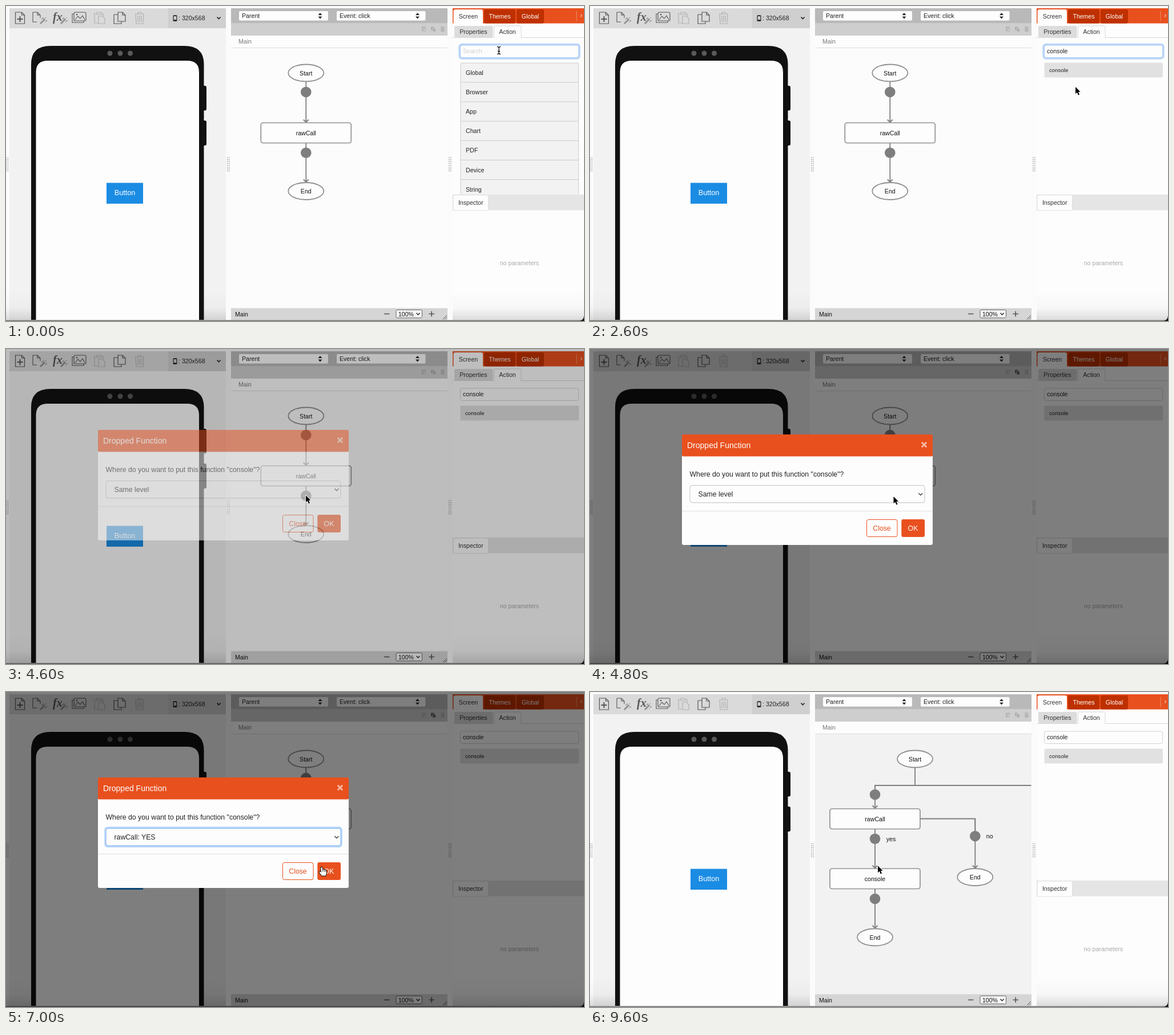
An HTML page that plays this animation: 1012x553 px, repeating every 10000 ms.

```html
<!DOCTYPE html>
<html lang="en">
<head>
<meta charset="utf-8">
<title>Flow editor</title>
<style>
html, body { margin: 0; width: 100%; height: 100%; overflow: hidden; background: #fbfbfb; }
svg { display: block; width: 100vw; height: 100vh; font-family: "Liberation Sans", Arial, sans-serif; }
</style>
</head>
<body>
<svg id="stage" viewBox="0 0 1012 553" xmlns="http://www.w3.org/2000/svg"></svg>
<script>
const ORANGE = '#e8501e', GREY = '#7e7e7e', WHITE = '#fdfdfd';

// Markup helpers
const rect = (x, y, w, h, fill, r = 0, extra = '') =>
  `<rect x="${x}" y="${y}" width="${w}" height="${h}" fill="${fill}" rx="${r}" ${extra}/>`;
const path = (d, stroke, width = 1, extra = '') =>
  `<path d="${d}" fill="none" stroke="${stroke}" stroke-width="${width}" ${extra}/>`;
const circle = (x, y, r, fill, extra = '') =>
  `<circle cx="${x}" cy="${y}" r="${r}" fill="${fill}" ${extra}/>`;
const text = (x, y, str, fill = '#222', size = 10.6, extra = '') =>
  `<text x="${x}" y="${y + size * 0.355}" font-size="${size}" fill="${fill}" ${extra}>${str}</text>`;
const label = (x, y, str, fill = '#111', size = 10.6) =>
  text(x, y, str, fill, size, 'text-anchor="middle"');
const group = (id, body, extra = '') => `<g id="${id}" ${extra}>${body}</g>`;
const at = (x, y, body, extra = '') => `<g transform="translate(${x} ${y})" ${extra}>${body}</g>`;
const outline = (color, width = 1) => `stroke="${color}" stroke-width="${width}"`;

function grip(x) {
  const dots = 'stroke-dasharray="1.6 1.7"';
  return path(`M${x - 1.5} 265.5V292M${x + 1.5} 265.5V292`, '#a5a5a5', 1.5, dots);
}

function wand(x, y) {
  return at(x, y, path('M-5 6L3 -2', '#555', 2.2) + path('M-5 6L3 -2', '#ddd', .8) +
    path('M0 -5V-2M5 -5L3.5 -3.5M4 1H7M-3 -3L-1.5 -1.5M4 4L3 3', '#555', .9));
}

function toolIcons() {
  const ink = '#565656', faint = '#b2b2b2';
  const page = 'M-8 -10H3L8 -5V10H-8ZM3 -10V-5H8';
  const copy = 'M-3 -10H5L10 -5V6H-3ZM5 -10V-5H10M-3 -6H-10V10H3V6';
  const bin = 'M-8 -7H8M-3 -7V-10H3V-7M-7 -7L-6 10H6L7 -7M-3 -4V7M0 -4V7M3 -4V7';
  return at(24.5, 21, path(page, ink, 1.2) + path('M0 -3V7M-5 2H5', ink, 2)) +
    at(54, 20, path('M-7 -9H1L6 -4V1M1 -9V-4H6M-7 -9V8H0', ink, 1.1)) + wand(65, 25) +
    text(82, 19, '<tspan font-style="italic">fx</tspan>', ink, 20,
      'font-family="Liberation Serif, serif" font-weight="bold"') + wand(101, 25) +
    at(128, 20, rect(-9, -9, 21, 15, 'none', 2, outline(ink, 1.1)) +
      path('M-9 -6H-12V9H8V6M-7 4L-2 -2L2 2L6 -3L10 4', ink, 1.1) + circle(-4, -5, 1.3, ink)) +
    at(164, 21, path('M-3 9H-9V-8H-5M2 -8H6V-3M-5 -10H2V-6H-5ZM-2 -3H5L9 1V10H-2Z', faint, 1.2)) +
    at(199, 21, path(copy, ink, 1.2)) +
    at(234, 21, path(bin, faint, 1.2));
}

function leftPanel() {
  return rect(6, 4, 379, 547, '#f2f2f2') + rect(6, 4, 379, 35, '#dadada') +
    rect(284, 4, 101, 35, '#cfcfcf') + toolIcons() +
    rect(292.5, 16, 7, 11, '#333', 1.5) + rect(293.8, 18, 4.4, 6, '#cfcfcf') +
    text(302, 21.5, ': 320x568') + path('M369.5 19.5L372.5 22.5L375.5 19.5', '#222', 1.7) +
    rect(0, 500, 385, 51, 'url(#floor)') +
    rect(336, 140, 15, 43.5, '#111', 3) + rect(336, 201, 15, 44, '#111', 3) +
    path('M44 551V102Q44 70 78 70H312Q346.5 70 346.5 102V551Z', 'none', 0, 'style="fill:#111"') +
    path('M52.5 551V116Q52.5 96 73 96H317Q338 96 338 116V551Z', 'none', 0, `style="fill:${WHITE}"`) +
    [182, 200, 217.5].map(x => circle(x, 83, 4.5, '#595959')).join('') +
    rect(176, 310.5, 64, 36.5, '#1b8ce3') + label(208, 328, 'Button', '#fff', 12.6);
}

function picker(x, w, str) {
  const a = x + w - 14;
  return rect(x, 9, w, 16.5, WHITE, 2) + text(x + 5, 17.7, str) +
    `<path d="M${a - 3.4} 16L${a} 12L${a + 3.4} 16ZM${a - 3.4} 18.5L${a} 22.5L${a + 3.4} 18.5Z" fill="#222"/>`;
}

function editorBars() {
  const dim = '#b5b5b5';
  return rect(394, 4, 379, 27, '#b9b9b9') + rect(394, 30, 379, 22, '#cecece') +
    picker(408, 156, 'Parent') + picker(579, 155.5, 'Event: click') +
    at(731.5, 40.5, rect(-3.5, -4, 7, 8, dim, 1) + rect(-1, -1, 4, 4, '#c9c9c9')) +
    group('copyIcon', rect(-4, -4, 5.5, 6, 'currentColor', .5) + rect(-1, -1.5, 5.5, 6, 'currentColor', .5, outline('#cecece', .7)),
      'transform="translate(748 40.5)"') +
    at(764.5, 40.5, rect(-3, -2, 6, 6.5, dim, .8) + path('M-4 -3.3H4M-1.5 -4.4H1.5', dim, 1.2)) +
    rect(394, 52, 379, 22, WHITE) + path('M394 73.5H773', '#dcdcdc') +
    text(407, 62.5, 'Main', '#777') +
    rect(394, 530.5, 379, 20.5, '#d5d5d5') + text(401, 541, 'Main', '#111') +
    path('M662 540.5H671.5M740.5 540.5H750M745.2 535.8V545.2', '#555', 1.6) +
    rect(683, 533.5, 45.5, 14, '#f4f4f4', 2, outline('#666')) + text(687, 541, '100%', '#111', 10.5) +
    path('M718.5 539L721.5 542L724.5 539', '#222', 1.3) +
    path('M765 550L772 543M768.5 550L772 546.5', '#555', 1);
}

// Flow chart pieces
const oval = (x, y, str) =>
  `<ellipse cx="${x}" cy="${y}" rx="31" ry="15" fill="${WHITE}" ${outline('#929292', 1.8)}/>` + label(x, y + .5, str);
const box = (x, y, str) =>
  rect(x - 79, y, 158, 35.5, WHITE, 4, outline('#929292', 1.7)) + label(x, y + 18, str);
const wire = d => path(d, GREY, 1.8);
const arrow = (x, y1, y2) => wire(`M${x} ${y1}V${y2}M${x - 4.5} ${y2 - 5.5}L${x} ${y2 - 1}L${x + 4.5} ${y2 - 5.5}`);
const knot = (x, y, extra = '') => circle(x, y, 9.3, GREY, extra);

function flowBefore() {
  return rect(394, 74, 379, 456.5, '#fcfcfc') +
    arrow(525.3, 132, 205) + arrow(525.3, 240, 310) +
    knot(525.3, 151) + knot(525.3, 257.7, 'id="dropSpot"') +
    oval(525.3, 117.5, 'Start') + box(525.3, 205, 'rawCall') + oval(525.3, 325, 'End');
}

function flowAfter() {
  return rect(394, 74, 379, 456.5, '#f2f2f2') +
    wire('M569 132V164H772.5M569 164H499V170') + arrow(499, 164, 205) + arrow(499, 240, 310) +
    arrow(499, 345, 415.5) + wire('M578 222.5H674.3V250') + arrow(674.3, 222.5, 310) +
    knot(499, 180) + knot(499, 257.7) + knot(499, 363) + knot(674.3, 253) +
    label(527, 258, 'yes') + label(699.7, 253, 'no') +
    oval(569, 117.5, 'Start') + box(499, 205, 'rawCall') + box(499, 310, 'console') +
    oval(499, 430.5, 'End') + oval(674.3, 325, 'End');
}

function categories() {
  const names = ['Global', 'Browser', 'App', 'Chart', 'PDF', 'Device', 'String'];
  return rect(796, 100, 206.5, 240, '#f2f2f2', 2, outline('#cbcbcb')) +
    names.map((name, i) => (i ? path(`M796 ${99.8 + i * 34.15}H1002.5`, '#cbcbcb') : '') +
      text(805, 117 + i * 34.15, name)).join('');
}

function rightPanel() {
  const tab = (x, w, str) => rect(x, 6, w, 24.5, '#be3000', 3) + label(x + w / 2, 18, str, '#fff', 10.5);
  return rect(782, 4, 230, 547, WHITE) + rect(782, 4, 230, 26.5, ORANGE) +
    '<path d="M783.5 32V9Q783.5 6 787 6H831.5Q835 6 835 9V32Z" fill="#fdfdfd"/>' + label(809.5, 18, 'Screen', '#333', 10.5) +
    tab(837, 55, 'Themes') + tab(894, 48, 'Global') +
    path('M999 9V26', '#f2926f') + path('M1006 14.5L1008.5 17L1006 19.5', '#f7b8a0', 1.1) +
    path('M782 55.5H1012', '#d8d8d8') + rect(785, 35, 67.5, 20, '#dcdcdc', 2) + label(818.3, 45.3, 'Properties', '#333') +
    `<path d="M854.5 56V37Q854.5 35 857 35H899.5Q902 35 902 37V56" fill="${WHITE}" stroke="#d8d8d8"/>` + label(878, 45.3, 'Action', '#333') +
    group('glow', rect(794, 67.5, 210, 24.5, 'none', 4, outline('#bcd6f8', 3.4))) +
    rect(795.5, 69, 207, 21.5, WHITE, 3, 'id="field" ' + outline('#d2d2d2')) +
    text(800, 79.7, '', '#222', 10.6, 'id="query"') +
    group('cats', categories()) +
    group('hit', rect(795.5, 99.5, 207.5, 26, '#e1e1e1', 2) + text(804, 112.5, 'console', '#222', 9.7)) +
    rect(782, 331, 230, 222, WHITE) + rect(782, 331, 230, 27.5, '#e5e5e5') +
    `<path d="M783 359V334.5Q783 332 786 332H841.5Q844.5 332 844.5 334.5V359Z" fill="${WHITE}" stroke="#dadada" stroke-width=".8"/>` +
    label(813.7, 345.4, 'Inspector', '#333') + label(899, 451, 'no parameters', '#a9a9a9') +
    rect(782, 500, 230, 51, 'url(#floor)');
}

function dialog() {
  return rect(161, 150, 439, 194, WHITE, 3) + rect(161, 150, 439, 38.5, ORANGE, 2) +
    text(170, 168.7, 'Dropped Function', '#fff', 14) +
    path('M580.8 163.8L589.2 172.2M589.2 163.8L580.8 172.2', '#f6b9a3', 2.8) +
    text(174.5, 219.2, 'Where do you want to put this function "console"?', '#222', 12.27) +
    group('selectGlow', rect(173.8, 238, 413.5, 33.3, 'none', 4, outline('#b4d4fb', 3))) +
    rect(175, 239.5, 411, 30.3, WHITE, 4, 'id="selectBox" ' + outline('#c0c0c8')) +
    text(189.5, 254.7, '', '#222', 12.27, 'id="choice"') + path('M575.3 253.2L578.8 256.7L582.3 253.2', '#333', 1.3) +
    path('M161 284.5H600', '#dedede') +
    rect(484.5, 299.5, 53.5, 30, WHITE, 3, outline(ORANGE)) + label(511, 314.3, 'Close', ORANGE, 12.3) +
    rect(545.3, 299, 40.7, 31, ORANGE, 3) + label(565.5, 314.3, 'OK', '#fff', 12.3);
}

function pointers() {
  const plus = 'M0 -6L2.2 -3.4H.9V-.9H3.4V-2.2L6 0L3.4 2.2V.9H.9V3.4H2.2L0 6L-2.2 3.4H-.9V.9H-3.4V2.2L-6 0L-3.4 -2.2V-.9H-.9V-3.4H-2.2Z';
  const hand = 'M3.2 1.2Q4.6 -.4 5.7 1.3L6.4 5Q8 3.8 8.9 5.4Q10.4 4.6 11 6.2Q12.6 5.8 12.8 7.5L13 11L11.5 15.5H5L1 10.2Q-.2 8.4 1.4 8L4 9.4Z';
  const solid = (d, fill, edge, w = 1) =>
    `<path d="${d}" fill="${fill}" stroke="${edge}" stroke-width="${w}" stroke-linejoin="round" paint-order="stroke"/>`;
  return group('ibeam', path('M-3 -6.5Q0 -6.5 0 -4.5Q0 -6.5 3 -6.5M0 -5V5M-3 6.5Q0 6.5 0 4.5Q0 6.5 3 6.5M-2 1.5H2', '#111', 1.3)) +
    group('arrow', solid('M0 0V12.2L2.8 9.6L4.9 14.4L7 13.5L4.9 8.8H8.6Z', '#000', '#fff', 1.8)) +
    group('badge', circle(8, 18, 8, '#17a11d', outline('#fff', .8)) + path('M8 13.7V22.3M3.7 18H12.3', '#fff', 2)) +
    group('hand', at(-4, -1, solid(hand, '#fff', '#000', 1.8) + path('M6.4 5V8M8.9 6V8.5M11 7V9', '#000', .8))) +
    group('move', solid(plus, '#000', '#fff', 1.8));
}

const stage = document.getElementById('stage');
stage.innerHTML = `<defs>
  <linearGradient id="floor" x1="0" y1="0" x2="0" y2="1">
    <stop offset="0" stop-color="#000" stop-opacity="0"/><stop offset=".6" stop-color="#000" stop-opacity=".025"/>
    <stop offset="1" stop-color="#000" stop-opacity=".13"/></linearGradient>
  <filter id="soft" x="-10%" y="-60%" width="120%" height="220%"><feGaussianBlur stdDeviation="4"/></filter></defs>` +
  rect(0, 0, 1012, 553, '#fbfbfb') + leftPanel() +
  group('before', flowBefore()) + group('after', flowAfter()) + editorBars() + rightPanel() +
  grip(2) + grip(389.3) + grip(777.3) +
  rect(0, 551.4, 1012, 1.6, '#77736f') + '<path d="M1012 544V553H1004Q1011 552 1012 544Z" fill="#111"/>' +
  group('ghost', rect(482, 242, 210, 26, '#000', 3, 'opacity=".2" filter="url(#soft)"') +
    rect(481, 240, 210.5, 26, '#e1e1e1', 3, 'opacity=".92"') + text(490.5, 253.2, 'console', '#222', 9.7)) +
  rect(0, 0, 1012, 553, '#000', 0, 'id="shade"') + group('dialog', dialog()) + group('cursor', pointers());

const el = id => document.getElementById(id);
const show = (id, on) => el(id).style.display = on ? '' : 'none';

// Pointer route: time, x, y
const route = [
  [0, 863, 78], [1800, 863, 78], [2600, 850, 142], [3000, 839, 116], [3200, 839, 116],
  [4400, 525, 257], [4600, 525, 257], [4800, 531.5, 259], [5400, 531.5, 259], [5800, 531, 262],
  [6200, 531, 262], [6800, 552, 308], [7400, 552, 308], [7800, 563, 313], [8400, 563, 313],
  [9400, 504, 305], [10000, 504, 305]
];

function pointerAt(t) {
  const i = Math.max(1, route.findIndex(p => p[0] > t));
  const [t0, x0, y0] = route[i - 1], [t1, x1, y1] = route[i];
  const k = (t - t0) / (t1 - t0), e = k * k * (3 - 2 * k);
  return [x0 + (x1 - x0) * e, y0 + (y1 - y0) * e];
}

function draw(t) {
  const [x, y] = pointerAt(t);

  const typed = 'console'.slice(0, Math.max(0, Math.floor(t / 200) - 1));
  el('query').textContent = typed || 'Search';
  el('query').setAttribute('fill', typed ? '#222' : '#cfcfcf');
  const filtered = typed.length > 3, focused = t < 3200;
  show('cats', !filtered);
  show('hit', filtered);
  show('glow', focused);
  el('field').setAttribute('stroke', focused ? '#a9caf5' : '#d2d2d2');

  const drag = t >= 3200 && t < 4600;
  const over = drag && t >= 4400;
  show('ghost', drag);
  el('ghost').setAttribute('transform', `translate(${x - 525} ${y - 257})`);
  el('dropSpot').setAttribute('fill', over ? '#e25555' : GREY);

  const done = t >= 7600;
  show('before', !done);
  show('after', done);

  const open = t < 4600 || done ? 0 : t < 4800 || t >= 7400 ? 0.5 : 1;
  el('shade').setAttribute('opacity', open * 0.5);
  el('dialog').setAttribute('opacity', open);
  el('dialog').setAttribute('transform', `translate(0 ${(open - 1) * 16})`);
  show('dialog', open > 0);
  el('copyIcon').style.color = open === 1 ? '#666' : '#b0b0b0';
  const picked = t >= 5200;
  show('selectGlow', picked);
  el('selectBox').setAttribute('stroke', picked ? '#83b6f0' : '#c0c0c8');
  el('choice').textContent = t >= 6200 ? 'rawCall: YES' : 'Same level';

  const onButton = open > 0 && x > 545 && y > 299;
  const onNode = done && x > 420 && x < 578 && y > 309;
  const typing = t >= 400 && t < 1800;
  const beam = t < 2000;
  el('cursor').setAttribute('transform', `translate(${x} ${y})`);
  show('cursor', !typing);
  show('ibeam', beam);
  show('hand', onButton);
  show('move', onNode);
  show('arrow', !beam && !onButton && !onNode);
  show('badge', drag && x < 772);
}

const start = performance.now();
function tick() {
  const t = (performance.now() - start) % 10000;
  draw(Math.floor(t / 200) * 200);
  requestAnimationFrame(tick);
}
tick();
</script>
</body>
</html>
```
